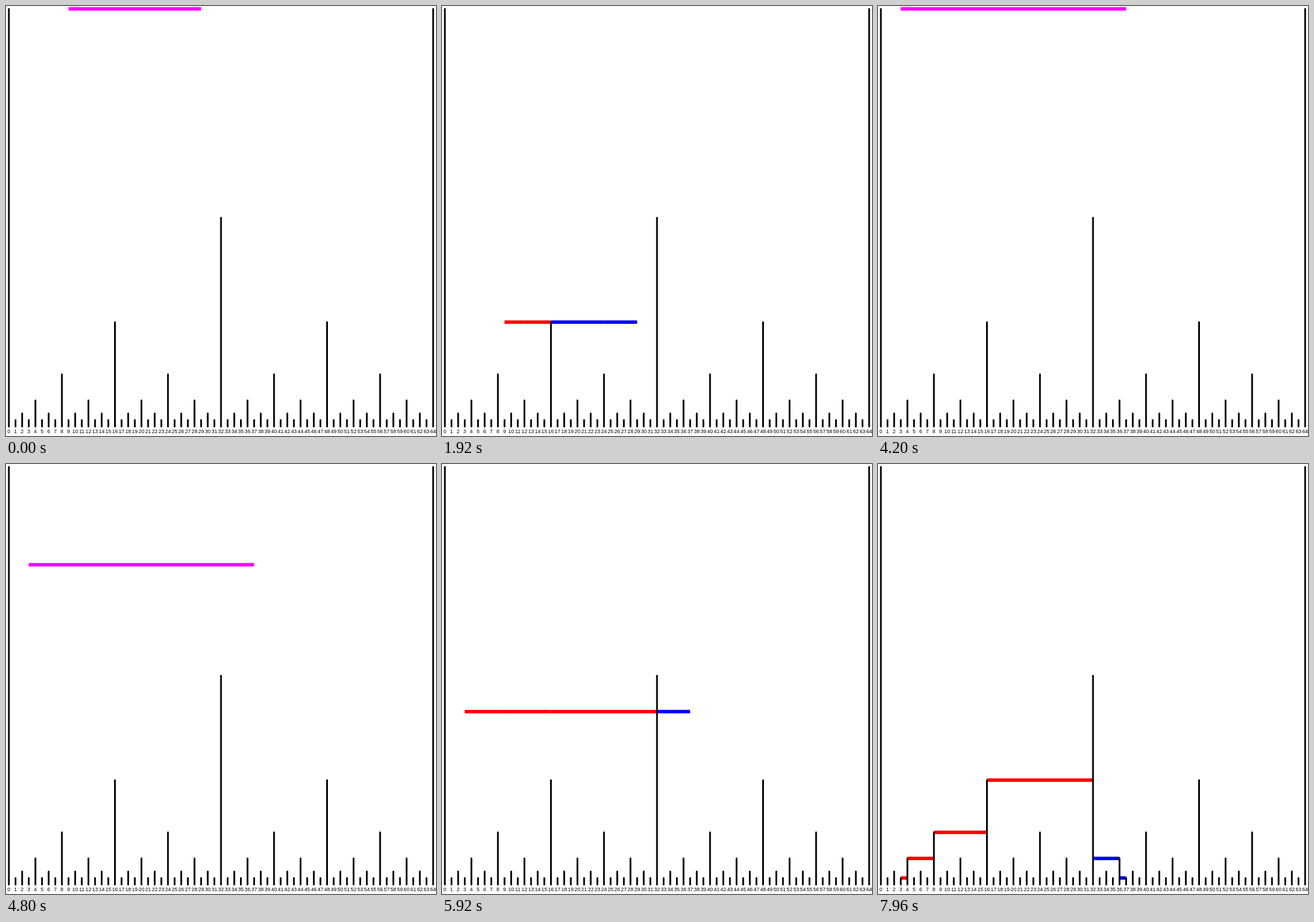
These frames come from a looping animation (748 px wide and 748 px high, 8 s). An HTML page with a canvas:

```html
<!DOCTYPE html>
<html lang="en">
<head>
<meta charset="utf-8">
<title>Splitting a range on a binary ruler</title>
<style>
  html, body { margin: 0; width: 100%; height: 100%; overflow: hidden; background: #fff; }
  canvas { display: block; width: 748px; height: 748px; }
</style>
</head>
<body>
<canvas id="stage" width="748" height="748"></canvas>
<script>
const ctx = document.getElementById('stage').getContext('2d');
const N = 64, EDGE = 5, STEP = 40, LOOP = 8000;
const DX = 738 / N, DY = 11.352;
const scenes = [
  { start: 0, from: 9, to: 29 },
  { start: 105, from: 3, to: 37 }
];

const x = i => EDGE + i * DX;
const y = depth => EDGE + depth * DY;
const level = i => (i & -i) || N;

// Cut the range into aligned power-of-two blocks.
function blocks(from, to) {
  const out = [];
  while (from < to) {
    let size = level(from);
    while (from + size > to) size /= 2;
    out.push({ from, size });
    from += size;
  }
  return out;
}

for (const s of scenes) {
  s.blocks = blocks(s.from, s.to);
  s.split = s.from + 1;
  for (let i = s.from + 1; i < s.to; i++) {
    if (level(i) > level(s.split)) s.split = i;
  }
}

function bar(from, to, depth, color) {
  ctx.fillStyle = color;
  ctx.fillRect(x(from), y(depth) - 3, x(to) - x(from), 6);
}

function drawRange(tick) {
  const s = tick < scenes[1].start ? scenes[0] : scenes[1];
  const k = tick - s.start;
  const splitDepth = N - level(s.split);
  if (k < splitDepth) {
    bar(s.from, s.to, k, '#f0f');
    return;
  }
  // The halves fall at half speed until each block rests on its tick.
  const depth = splitDepth + (k - splitDepth) / 2;
  for (const { from, size } of s.blocks) {
    bar(from, from + size, Math.min(depth, N - size), from < s.split ? '#f00' : '#00f');
  }
}

function drawRuler() {
  ctx.strokeStyle = ctx.fillStyle = '#000';
  ctx.lineWidth = 3;
  ctx.lineCap = 'round';
  ctx.font = '9px "Liberation Sans", Arial, sans-serif';
  ctx.textAlign = 'center';
  for (let i = 0; i <= N; i++) {
    ctx.beginPath();
    ctx.moveTo(x(i), y(N - level(i)));
    ctx.lineTo(x(i), y(N));
    ctx.stroke();
    ctx.fillText(i, x(i), 743.3);
  }
}

function frame() {
  const tick = Math.floor((performance.now() % LOOP) / STEP);
  ctx.fillStyle = '#fff';
  ctx.fillRect(0, 0, 748, 748);
  drawRange(tick);
  drawRuler();
  requestAnimationFrame(frame);
}
frame();
</script>
</body>
</html>
```
